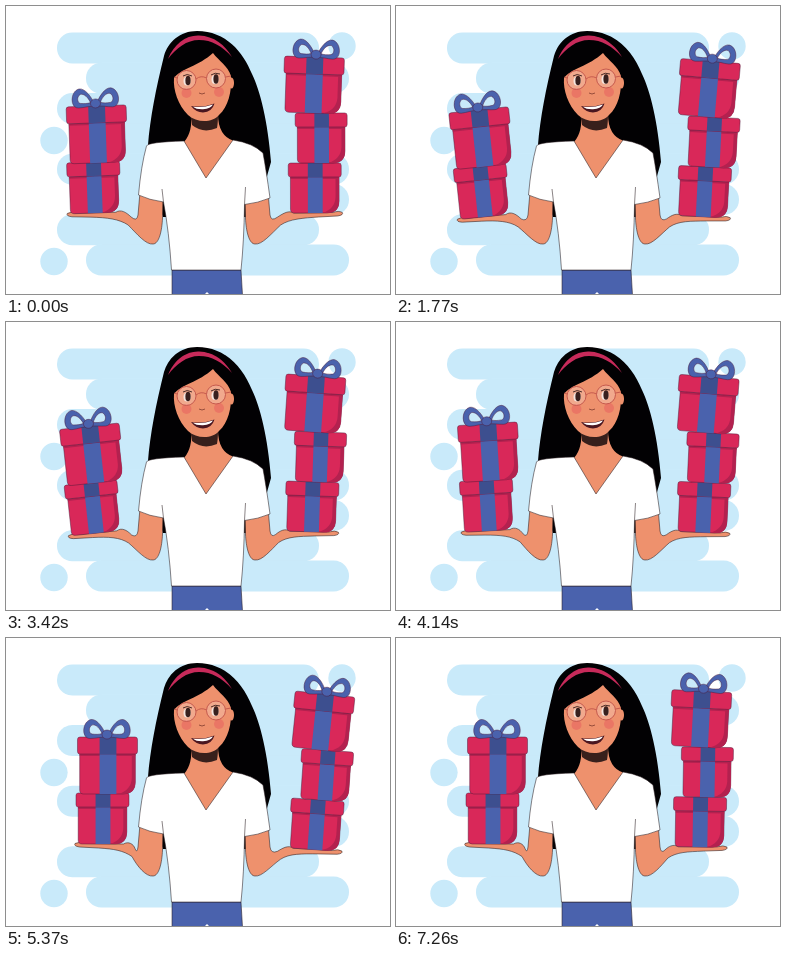
Animation, 384 px wide and 288 px high, one loop 8000 ms. Source, as an HTML page:

```html
<!DOCTYPE html>
<html lang="en">
<head>
<meta charset="utf-8">
<title>Balancing gifts</title>
<style>
html, body { margin: 0; width: 100%; height: 100%; overflow: hidden; background: #fff; }
svg { display: block; width: 100vw; height: 100vh; }
.line { stroke: #2a1c20; stroke-width: .55; stroke-linejoin: round; }
.edge { stroke: #4a1838; stroke-width: .45; stroke-linejoin: round; }
.skin { fill: #ee916d; }
.red { fill: #d92859; }
.blue { fill: #4a62ad; }
</style>
</head>
<body>
<svg viewBox="0 0 384 288">
  <g id="cloud" fill="#c9eafa"></g>
  <path d="M191 25C174 25 162 36 158 50C150 82 144 113 142 139L150 190L157 211L241 211L254 195L265 156C262 116 254 84 246 68C237 46 220 25 191 25Z" fill="#020103"/>
  <path d="M162 53C168 38 180 29 193 29.500C208 30 219 39 226 51C216 40 206 34 193 34C181 34 170 42 162 53Z" fill="#c72a5a"/>

  <path class="skin" d="M185 106Q187 126 178 136L200 174L228 135Q212 130 212 108Z"/>
  <path d="M184 110Q186 115 186 119Q197 128 211 122Q212 117 212 108Z" fill="#38201c"/>
  <ellipse class="skin" cx="225.500" cy="77" rx="2.500" ry="5.500"/>
  <path class="skin" d="M168 72C174 63 193 60 207 47C213 55 222 60 225 70C226 86 222 101 213 109C206 117 191 117 182 109C172 99 167 84 168 72Z"/>
  <g fill="#e8615f" opacity=".55">
    <circle cx="180.500" cy="87" r="5"/><circle cx="213" cy="86" r="5"/>
  </g>
  <g fill="#fff" fill-opacity=".22" stroke="#c65a4e" stroke-width="1">
    <circle cx="180.500" cy="74" r="9.500"/><circle cx="210" cy="72.500" r="9.500"/>
    <path d="M190 73Q195 69 200.500 72M171 72L168.500 71M219.500 71L225 70" fill="none"/>
  </g>
  <g fill="#f5e5df">
    <ellipse cx="181" cy="75" rx="3.500" ry="4.500"/><ellipse cx="209" cy="73.500" rx="3.500" ry="4.500"/>
  </g>
  <g fill="#38201e">
    <ellipse cx="182" cy="74.500" rx="2.600" ry="4.800"/><ellipse cx="210" cy="73" rx="2.600" ry="4.800"/>
  </g>
  <g fill="none" stroke="#38201e" stroke-width=".9">
    <path d="M177 70Q181 67 186 70M205 69Q209 66 214 68"/>
    <path d="M193 87Q196 89 199 87" stroke="#8d4636"/>
  </g>
  <path d="M185 100Q197 102 208.500 97.500Q206 106 197 106.500Q190 106.500 185 100Z" fill="#4a1620"/>
  <path d="M187 100.700Q197 102 207 98.500Q205 102.500 197 103.200Q190 103.400 187 100.700Z" fill="#fff"/>

  <path id="armL" class="skin line"/>
  <path id="armR" class="skin line" transform="translate(396 0) scale(-1 1)"/>
  <path class="line blue" d="M166 264H235L236.500 289H166Z"/>
  <path d="M199 288L201 286L203 288Z" fill="#fff"/>
  <path class="line" d="M178 135L200 172L227 134Q247 137 257 147Q260 163 264 192Q252 197 238.500 198.500Q238 235 235 264H165.500Q163 225 157.500 196Q143 194 132.500 189Q135 160 140.500 140Q142 136 178 135Z" fill="#fff"/>
  <path d="M157.500 196L156 183M238.500 198.500L239.500 181" fill="none" class="line"/>
  <g id="stackL"></g>
  <g id="stackR"></g>
</svg>
<script>
const $ = id => document.getElementById(id);
const LOOP = 8000, LAST = 7260, STEP = 30;

// Stacked bars; a 1 marks a bar that reaches the right edge
const disc = (x, y) => `<circle cx="${x}" cy="${y}" r="13.7"/>`;
$('cloud').innerHTML = [...'01001101'].map((wide, i) => {
  const left = i % 2 ? 80 : 51, right = +wide ? 343 : 313;
  return `<rect x="${left}" y="${26.5 + i * 30.3}" width="${right - left}" height="31" rx="15.3"/>`;
}).join('') + disc(48, 134.5) + disc(48, 255.5) + disc(336, 40);

// A gift box whose bottom centre is at (x, y)
function box(x, y, w, h, lid, extra = '', tilt = 0) {
  const l = w / 2, b = l - 2.2, rim = lid - h, rib = w * .14;
  return `<g transform="translate(${x} ${y}) rotate(${tilt})">
    <path class="edge red" d="M${-b} ${rim}H${b}V-12Q${b} 0 ${b - 12} 0H${4 - b}Q${-b} 0 ${-b} -4Z"/>
    <path fill="#b3214f" d="M${b} ${rim}V-12Q${b} 0 ${b - 12} 0H${b - 17}Q${b - 4} -4 ${b - 3.5} -16V${rim}Z"/>
    <rect fill="#b3214f" x="${-b}" y="${rim}" width="${2 * b}" height="2"/>
    <rect class="blue" x="${.5 - rib}" y="${rim}" width="${2 * rib}" height="${h - lid}"/>
    <rect class="edge red" x="${-l}" y="${-h}" width="${w}" height="${lid}" rx="2.5"/>
    <rect fill="#3d4f8f" x="${.5 - rib}" y="${-h}" width="${2 * rib}" height="${lid}"/>
    ${extra}
  </g>`;
}

function bow(x, y) {
  const loop = side => `<path transform="scale(${side} 1)" class="edge blue" fill-rule="evenodd"
    d="M0 0C-3 -9 -10 -19 -16 -18C-25 -16 -26 1 -17 1C-11 1 -6 -1 0 0Z
       M-5 -4C-7 -9 -11 -13.500 -15 -12.500C-19 -10 -18 -4 -15 -3.500C-11 -3 -8 -3 -5 -4Z"/>`;
  return `<g transform="translate(${x} ${y})">${loop(1)}${loop(-1)}
    <ellipse class="edge blue" cy="-3" rx="5" ry="4.500"/></g>`;
}

$('stackL').innerHTML = box(0, 0, 53, 51, 14) + box(5, -50, 60, 57, 17, bow(-.5, -56.5));
$('stackR').innerHTML = box(0, 0, 53, 50, 14) + box(6.5, -50, 52, 50, 14) +
  box(-2, -100, 60, 56, 17, bow(1.5, -55.5), 2);

const ramp = (t, from, to) => Math.min(1, Math.max(0, (t - from) / (to - from)));
const ease = (t, from, to) => {
  const u = ramp(t, from, to);
  return u * u * (3 - 2 * u);
};

// Left stack sinks outwards, then comes upright
function poseL(t) {
  const sink = ease(t, 0, 2600), rise = ease(t, 2800, 5400);
  return { x: 88.8 + 7.7 * rise, y: 207 + 5 * sink - 6 * rise, tilt: -2 - 5.3 * sink + 7.3 * rise };
}

// Right stack leans out quickly, swings back, then repeats more slowly
function poseR(t) {
  const first = ease(t, 0, 1200);
  const lean = first - ease(t, 1200, 2350) + ramp(t, 2500, 6270) - ease(t, 6270, 7320);
  const lift = 1 - first;
  return { x: 303.3 + 6.7 * lean + 5.5 * lift, y: 209 + 3.5 * lean - 2 * lift, tilt: .9 + 4 * lean - lift };
}

// Left-hand arm with a fixed elbow; the palm follows the base of the stack
function arm({ x, y, tilt }) {
  const a = tilt * Math.PI / 180;
  const at = (dx, dy) => `${x + dx * Math.cos(a) - dy * Math.sin(a)} ${y + dx * Math.sin(a) + dy * Math.cos(a)}`;
  const midX = 122 + (x - 88.5) * .5, midY = 219 + (y - 207) * .5;
  return `M134 186L157 190L156.500 212C156 225 153 238 147 238C140 239 131 228 ${midX} ${midY}
    C${midX - 9} ${midY - 6} ${at(12, 5)} ${at(-4, 4)}L${at(-23, 3)}Q${at(-29, 2)} ${at(-27.5, -.5)}
    Q${at(-24, -2.5)} ${at(-18, -.5)}L${at(21, 0)}C${at(26, -3)} ${at(31, 0)} ${midX + 3} ${midY - 8}
    Q131 216 132 209Z`;
}

const mirror = p => ({ x: 396 - p.x, y: p.y, tilt: -p.tilt });
const place = (id, p) => $(id).setAttribute('transform', `translate(${p.x} ${p.y}) rotate(${p.tilt})`);

function draw(ms) {
  const t = Math.min(LAST, Math.floor(ms % LOOP / STEP) * STEP);
  const left = poseL(t), right = poseR(t);
  place('stackL', left);
  place('stackR', right);
  $('armL').setAttribute('d', arm(left));
  $('armR').setAttribute('d', arm(mirror(right)));
}

const start = performance.now();
function tick() {
  draw(performance.now() - start);
  requestAnimationFrame(tick);
}
tick();
</script>
</body>
</html>
```
